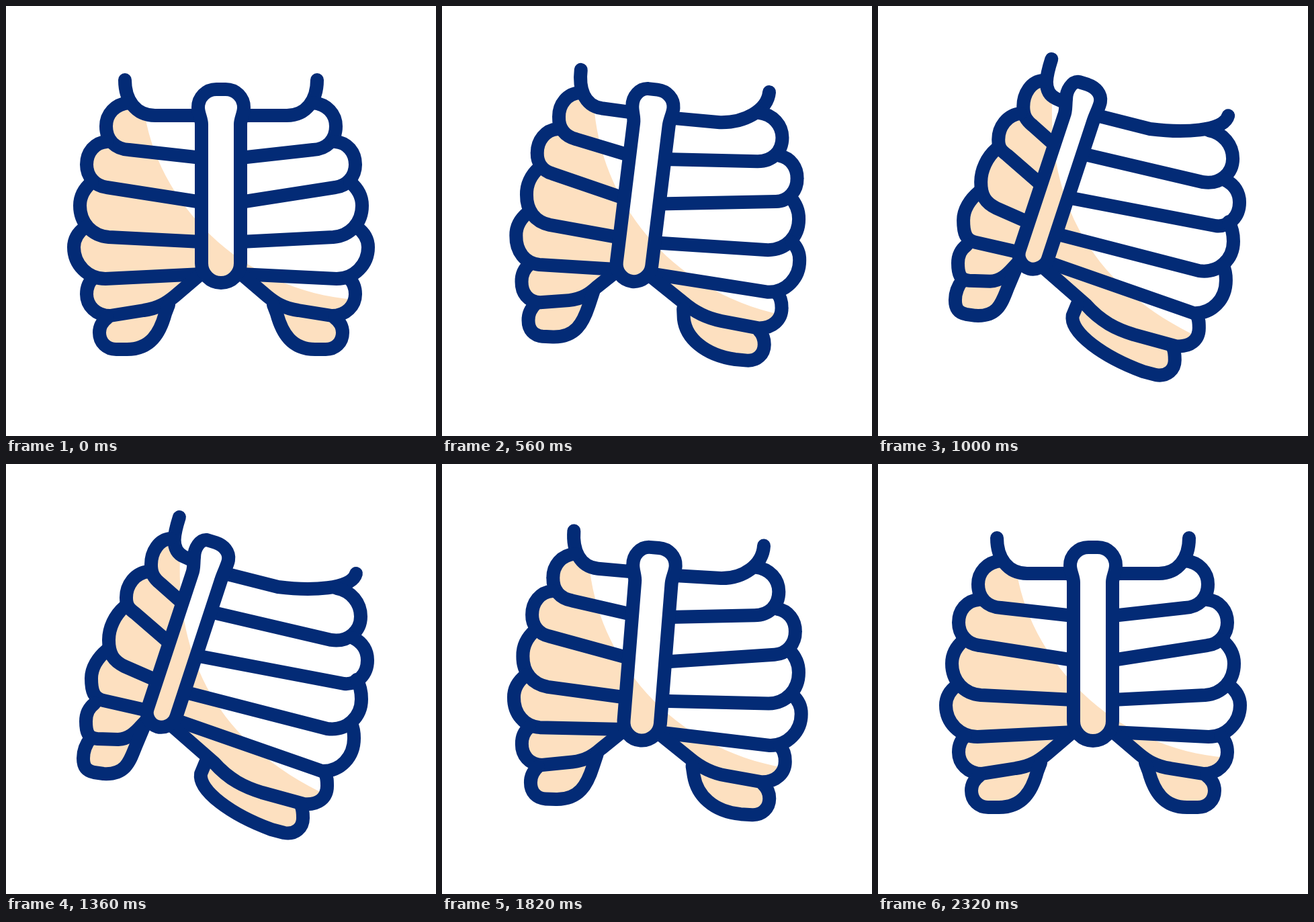
An HTML page with a canvas that plays this animation: 640 px wide and 640 px high, repeating every 2.4 s.

```html
<!DOCTYPE html>
<html lang="en">
<head>
<meta charset="utf-8">
<title>Rib cage</title>
<style>
html, body { margin: 0; height: 100%; overflow: hidden; background: #fff; }
canvas { display: block; }
</style>
</head>
<body>
<canvas id="stage" width="640" height="640"></canvas>
<script>
const ctx = document.getElementById('stage').getContext('2d');
const NAVY = '#032b76', PEACH = '#fde0c0';
const LOOP = 2400, HALF = 1170, CENTRE = 320;
const TURN = 18 * Math.PI / 180;
const LEAN_AT = 0.985; // progress at which the leaning poses are drawn

const mirror = d => d.replace(/(\d+) (\d+)/g, (_, x, y) => `${640 - x} ${y}`);
const numbers = d => d.match(/-?\d+(\.\d+)?/g).map(Number);

function rotate(x, y, angle) {
  const c = Math.cos(angle), s = Math.sin(angle);
  x -= CENTRE;
  y -= CENTRE;
  return [CENTRE + x * c - y * s, CENTRE + x * s + y * c];
}

// A pose pair keeps the bend of the shape apart from the turn of the whole.
function pose(rest, lean) {
  const to = numbers(lean), bent = [];
  for (let i = 0; i < to.length; i += 2)
    bent.push(...rotate(to[i], to[i + 1], -TURN * LEAN_AT));
  return { rest, bent };
}

function pathAt({ rest, bent }, k) {
  let i = 0;
  const next = n => +n + (bent[i++] - n) * k / LEAN_AT;
  return rest.replace(/(\d+) (\d+)/g, (_, x, y) =>
    rotate(next(x), next(y), TURN * k).map(n => n.toFixed(2)).join(' '));
}

const left = [], right = [];
function bone(rest, leanLeft, leanRight) {
  left.push(pose(rest, leanLeft));
  right.push(pose(mirror(rest), leanRight));
}

// Clavicles, then six ribs from top to bottom.
bone('M177 110C177 140 193 163 222 163L291 163',
     'M258 79C251 101 243 128 265 138L283 146',
     'M521 163C515 187 453 189 405 183L322 162');
bone('M183 144C162 146 149 161 149 179C149 200 163 213 183 214L291 226',
     'M245 111C228 112 216 130 216 150C216 163 220 170 230 178L265 209',
     'M492 185C514 189 528 207 528 227C528 248 510 266 484 262L304 220');
bone('M150 202C132 203 120 218 120 236C120 253 132 268 150 270L291 292',
     'M212 160C192 162 179 180 179 199C179 212 184 216 192 222L244 267',
     'M517 259C531 266 538 278 538 292C538 313 523 329 503 327L282 285');
bone('M128 262C116 272 110 284 110 297C110 323 128 342 153 344L291 351',
     'M176 213C162 225 153 244 153 262C153 283 160 293 176 301L224 322',
     'M522 321C527 330 529 340 529 350C529 376 508 398 478 394L264 339');
bone('M118 329C107 337 101 347 101 359C101 385 122 406 148 406L291 399',
     'M150 277C137 288 127 303 127 319C127 339 131 349 145 352L211 367',
     'M514 387C517 393 518 400 518 408C518 436 498 458 470 457L252 381');
bone('M130 405C123 411 120 420 120 429C120 446 134 461 155 461L205 453C227 450 240 441 251 432L291 398',
     'M132 356C123 363 119 371 119 383C119 399 122 408 136 409L167 410C183 409 192 400 201 390L216 374',
     'M474 459C478 465 478 472 478 479C478 497 465 508 443 506L381 489C355 481 332 470 309 444L245 388');
bone('M151 464C143 470 139 478 139 486C139 501 150 511 164 511L180 511C215 511 229 487 237 458L242 445',
     'M126 408C118 418 115 427 115 438C115 452 121 457 131 459L145 461C178 463 184 443 193 420L206 389',
     'M439 508C442 514 442 520 442 527C442 541 431 552 414 549L395 544C335 522 286 486 290 461L297 444');

const sternum = pose(
  'M291 383L291 176C291 168 286 160 286 151C286 136 298 124 313 124L327 124' +
  'C342 124 354 136 354 151C354 160 349 168 349 176L349 383C349 399 336 412 320 412C304 412 291 399 291 383Z',
  'M211 363L277 163C280 156 279 148 280 139C280 125 289 112 299 113L312 117' +
  'C324 121 333 131 331 143C330 150 323 163 320 173L253 377C249 388 236 394 225 391C213 387 207 374 211 363Z'
);
const shade = pose(
  'M205 150C222 290 350 425 520 437L640 640L0 640L0 0L200 0Z',
  'M259 140C254 287 313 416 480 494L640 640L0 640L0 0L259 0Z'
);

// Cubic ease-in-out with handles at .85 and .15.
function ease(x) {
  let lo = 0, hi = 1, u;
  for (let i = 0; i < 30; i++) {
    u = (lo + hi) / 2;
    const v = 1 - u;
    if (2.55 * u * v * v + 0.45 * u * u * v + u * u * u < x) lo = u; else hi = u;
  }
  return u * u * (3 - 2 * u);
}

function fillShaded(path, area) {
  ctx.save();
  ctx.clip(area);
  ctx.fillStyle = PEACH;
  ctx.fill(path);
  ctx.restore();
}

function drawSide(bones, k, area) {
  const paths = bones.map(b => pathAt(b, k));
  paths.slice(1).forEach((d, i) => {
    // Close each rib along the lower edge of the one above.
    const [ex, ey, x, y] = numbers(paths[i]).slice(-4);
    fillShaded(new Path2D(`${d}L${x} ${y}L${ex} ${ey}Z`), area);
  });
  paths.forEach(d => ctx.stroke(new Path2D(d)));
}

function draw(now) {
  const k = ease(Math.max(0, 1 - Math.abs((now % LOOP) / HALF - 1)));
  const area = new Path2D(pathAt(shade, k));
  const breast = new Path2D(pathAt(sternum, k));

  ctx.fillStyle = '#fff';
  ctx.fillRect(0, 0, 640, 640);
  ctx.strokeStyle = NAVY;
  ctx.lineWidth = 20;
  ctx.lineCap = ctx.lineJoin = 'round';
  drawSide(left, k, area);
  drawSide(right, k, area);
  ctx.fillStyle = '#fff';
  ctx.fill(breast);
  fillShaded(breast, area);
  ctx.stroke(breast);
}

const start = performance.now();
function tick() {
  draw(performance.now() - start);
  requestAnimationFrame(tick);
}
tick();
</script>
</body>
</html>
```
